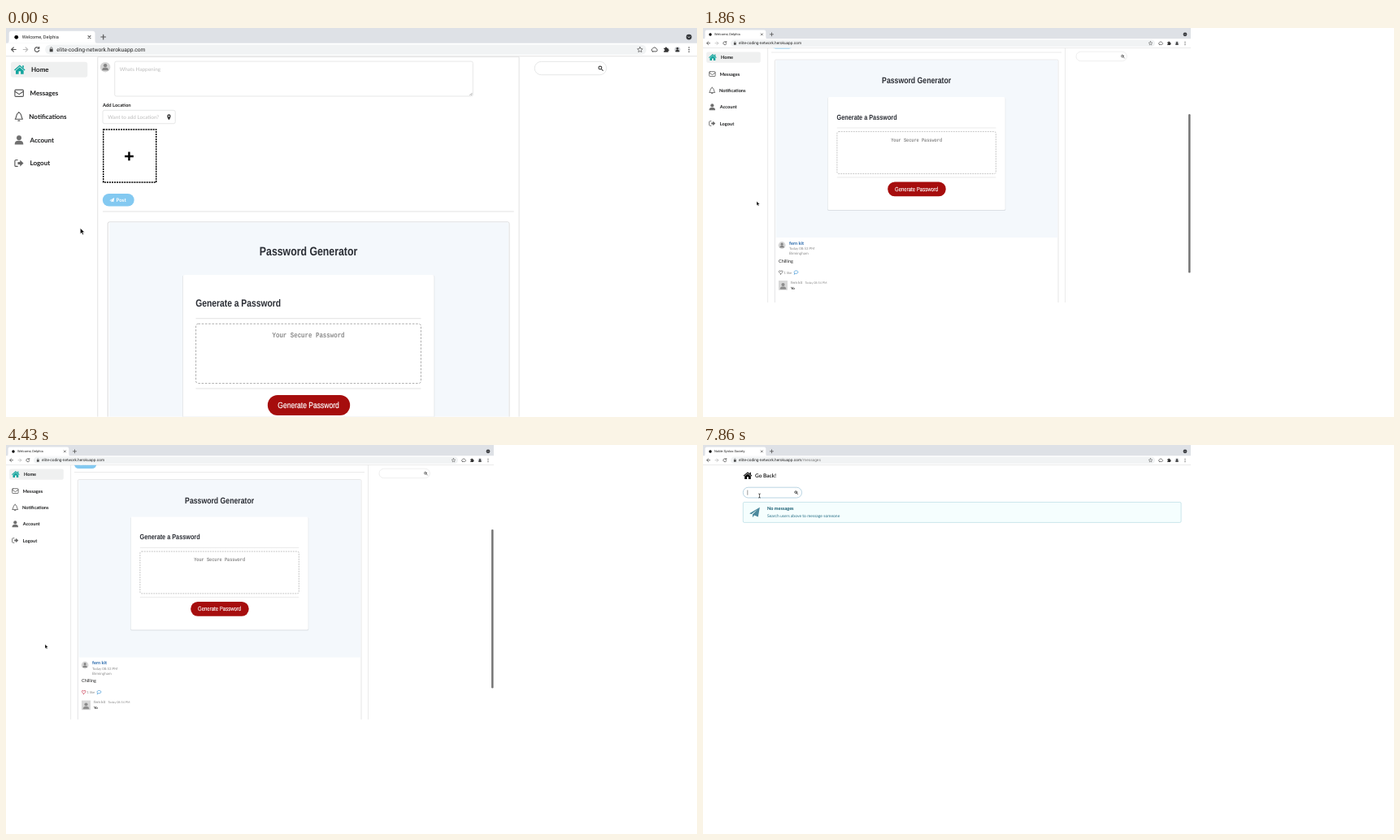
These frames come from a looping animation (850x479 px, 8 s). An HTML page:

```html
<!DOCTYPE html>
<html lang="en">
<head>
<meta charset="utf-8">
<title>Social feed walkthrough</title>
<style>
  html, body { margin: 0; width: 100%; height: 100%; overflow: hidden; background: #fff; }
  svg { display: block; width: 850px; height: 479px; }
  text { font-family: Lato, sans-serif; font-size: 4.5px; fill: #222; text-rendering: geometricPrecision; white-space: pre; }
  .ui { font-family: Roboto, sans-serif; }
  .b { font-weight: 700; }
  .menu text { font-size: 5.65px; font-weight: 700; fill: #1b1c1d; }
  .hint { fill: #bdbdbd; }
  .dim { fill: #8a8a8a; }
  .box { fill: #fff; stroke: #dcdddd; stroke-width: .5; }
  .rule { stroke: #d6d6d6; stroke-width: .5; fill: none; }
  .line { fill: none; stroke: #555; stroke-width: .8; stroke-linecap: round; stroke-linejoin: round; }
  .pic text { font-family: "Liberation Sans", Arial, sans-serif; }
  .pic .code { font-family: "Liberation Mono", "Courier New", monospace; }
</style>
</head>
<body>
<svg viewBox="0 0 850 479">
  <defs>
    <clipPath id="view"><rect width="600" height="338"/></clipPath>
    <clipPath id="page"><rect y="24.8" width="600" height="313.2"/></clipPath>
    <path id="house" d="M-4.8.3 0-3.9 4.8.3 4.1 1 0-2.6-4.1 1zM-3.4 1 0-1.9 3.4 1V4H.9V1.5H-.9V4H-3.4zM2.3-3.4h1.2v2.3l-1.2-1z"/>
    <path id="plane" d="M-5 1 5-5 3.4 4.4-.4 2.8-2 5-2 2 3-3-3.2 1.7z"/>
    <g id="person"><circle cy="-1.7" r="1.9"/><path d="M-3.4 3.6C-3.4 1-2 .6 0 .6S3.4 1 3.4 3.6z"/></g>
    <g id="lens" fill="none" stroke-width=".8" stroke-linecap="round"><circle cx="-.4" cy="-.4" r="1.35"/><path d="M.7.7 2 2"/></g>
    <g id="face"><circle r="4.4" fill="#d6d6d6"/><use href="#person" fill="#858585" transform="scale(.8)"/></g>
  </defs>

  <g id="screen" clip-path="url(#view)">
    <!-- browser frame -->
    <rect width="600" height="13.2" fill="#dee1e6"/>
    <path d="M1 13.2Q2.6 13.2 2.6 11V4.8Q2.6 2.6 4.8 2.6H75.2Q77.3 2.6 77.3 4.8V11Q77.3 13.2 79 13.2z" fill="#fff"/>
    <circle cx="9" cy="8" r="1.7"/>
    <text id="tab" class="ui" x="14" y="9.3" style="font-size:4px"></text>
    <path class="line" d="M71.3 6.8l2.1 2.1m0-2.1-2.1 2.1" stroke-width=".6"/>
    <path class="line" d="M82.5 7.8h4m-2-2v4"/>
    <circle cx="593" cy="7.8" r="2.4" fill="#35383c"/>
    <path d="M592 7.4l1 1 1-1" fill="none" stroke="#fff" stroke-width=".5"/>
    <rect x="34" y="14.5" width="522" height="8.6" rx="4.3" fill="#f1f3f4"/>
    <path class="line" d="M8.6 18.7H4.8m1.8-1.9-1.9 1.9 1.9 1.9"/>
    <path class="line" d="M15 18.7h3.8m-1.8-1.9 1.9 1.9-1.9 1.9" style="stroke:#bbb"/>
    <path class="line" d="M28.5 17.5A2 2 0 1 0 28.8 19.4M28.8 16.5v1.3h-1.3"/>
    <path d="M37.9 18.2h2.8v2.5h-2.8z" fill="#444"/>
    <path class="line" d="M38.5 18.2v-.7a.8.8 0 0 1 1.6 0v.7" style="stroke-width:.5"/>
    <text class="ui" x="44" y="20.3" style="font-size:4.75px">elite-coding-network.herokuapp.com<tspan id="path" fill="#777"></tspan></text>
    <path class="line" d="M550.5 16.5l.7 1.5 1.6.2-1.2 1.1.3 1.6-1.4-.8-1.4.8.3-1.6-1.2-1.1 1.6-.2z" style="stroke-width:.5"/>
    <path class="line" d="M561.5 20.4h3.2a1.2 1.2 0 0 0 0-2.3 1.7 1.7 0 0 0-3.2-.2 1.3 1.3 0 0 0 0 2.5z" style="stroke-width:.7"/>
    <path d="M571.2 17.4h1.1a.8.8 0 0 1 1.6 0h1.1v1.1a.8.8 0 0 1 0 1.6v.9h-3.8v-1a.8.8 0 0 0 0-1.6z" fill="#333"/>
    <circle cx="583" cy="18.7" r="2.5" fill="#cfd2d6"/>
    <use href="#person" transform="translate(583 18.8) scale(.52)" fill="#333"/>
    <g fill="#444"><circle cx="593" cy="17" r=".55"/><circle cx="593" cy="18.8" r=".55"/><circle cx="593" cy="20.6" r=".55"/></g>
    <path class="rule" d="M0 24.5H600"/>

    <g clip-path="url(#page)">
      <g id="feed">
        <g id="scroll">
          <path class="rule" d="M79.6 25.2H445.5V520.5H79.6z"/>
          <use href="#face" x="86.2" y="34"/>
          <rect class="box" x="94.4" y="29" width="311" height="30.3" rx="1.5"/>
          <text class="hint" x="98.6" y="37.2">Whats Happening</text>
          <path d="M402.6 58.6l2.2-2.2m-1 2.2 1-1" stroke="#777" stroke-width=".4"/>
          <text class="b" x="84" y="68.5" style="font-size:4.15px">Add Location</text>
          <rect class="box" x="84" y="71.5" width="63" height="11.6" rx="1.5"/>
          <text class="hint" x="88.4" y="78.9">Want to add Location?</text>
          <path d="M141.5 80c-2.2-2.8-1.8-5 0-5s2.2 2.2 0 5zM141.5 76a.6.6 0 1 0 .01 0z" fill="#333" fill-rule="evenodd"/>
          <rect x="84.5" y="88.2" width="45.9" height="45.9" fill="none" stroke="#000" stroke-dasharray="1.45 .7"/>
          <path d="M103.1 111.5h7.6m-3.8-3.8v7.6" stroke="#000" stroke-width="1.7"/>
          <rect x="83.9" y="144" width="27.4" height="11" rx="5.5" fill="#83c9f1"/>
          <use href="#plane" transform="translate(92 149.5) scale(.4)" fill="#fff"/>
          <text class="b" x="95.6" y="151.1" style="font-size:4.4px;fill:#fff">Post</text>
          <path class="rule" d="M84 159.5H441"/>

          <rect x="88.4" y="168.6" width="348.6" height="317.8" rx="1.5" fill="#fff" stroke="#d4d4d5" stroke-width=".6"/>
          <path d="M89 486.5H436.5" stroke="#aaa" stroke-width=".6"/>
          <g class="pic">
            <rect x="89.6" y="169" width="346.8" height="218.5" fill="#f4f8fc"/>
            <rect x="153.2" y="214.9" width="219" height="139.6" rx="1.5" fill="#dce0e4"/>
            <rect x="153.7" y="214.5" width="218" height="139" rx="1.5" fill="#fff"/>
            <path class="rule" d="M164.8 252.5H360.3M164.8 313.4H360.3"/>
            <rect x="164.9" y="257.1" width="195.4" height="51.8" rx="2" fill="none" stroke="#aaa" stroke-width=".7" stroke-dasharray="1.8 1.2"/>
            <rect x="227.2" y="319" width="71.5" height="17.7" rx="8.6" fill="#a60d0d"/>
            <!-- the screenshot is narrowed to fit the card -->
            <g transform="translate(262.6) scale(.82 1)">
              <text class="b" y="197.7" text-anchor="middle" style="font-size:10.6px;fill:#2a2d34">Password Generator</text>
              <text class="b" x="-119.5" y="242.2" style="font-size:8.9px;fill:#2a2d34">Generate a Password</text>
              <text class="code b" y="269" text-anchor="middle" style="font-size:6.4px;fill:#8c8c8c">Your Secure Password</text>
              <text y="330.4" text-anchor="middle" style="font-size:7.35px;fill:#fff;stroke:#fff;stroke-width:.15">Generate Password</text>
            </g>
          </g>

          <use href="#face" x="97.1" y="397"/>
          <text class="b" x="106" y="396.3" style="font-size:5.6px;fill:#1e62a8">fern kit</text>
          <text class="dim" x="106" y="402.7" style="font-size:4.35px">Today 08:53 PM</text>
          <text class="dim" x="106" y="408.9">Birmingham</text>
          <text x="93" y="418.2" style="font-size:5.5px">Chilling</text>
          <path id="heart" class="line" d="M95.7 432.5C92.5 430 93.2 428.3 94.4 428.3q.9 0 1.3 1 .4-1 1.3-1c1.2 0 1.9 1.7-1.3 4.2z" style="stroke-width:.7"/>
          <text class="dim" x="99.5" y="432.1" style="font-size:4.2px">1 like</text>
          <path class="line" d="M112.3 432.5l.5-1.1a2.4 1.8 0 1 1 1.2.5z" style="stroke:#2185d0;stroke-width:.6"/>
          <rect x="93" y="440.6" width="11" height="11.6" fill="#d8d8d8"/>
          <use href="#person" transform="translate(98.5 447.4) scale(1.1)" fill="#8d8d8d"/>
          <text x="108" y="444.4" style="fill:#777">fern kit</text>
          <text class="dim" x="125.6" y="444.2" style="font-size:3.75px">Today 08:54 PM</text>
          <text class="b" x="108" y="451.1" style="font-size:4.4px">Yo</text>
          <rect class="box" x="93" y="471.1" width="328" height="11.6" rx="1.2"/>
          <text class="hint" x="97.2" y="478.5">Add Comment</text>
          <path d="M420 471h10.8q1.2 0 1.2 1.2v9.4q0 1.2-1.2 1.2H420z" fill="#86c2e6"/>
          <path d="M426.2 475.2H424.2V479H428V477.3M425.7 477.5l2.7-2.8" fill="none" stroke="#fff" stroke-width=".7"/>
          <path class="line" d="M259.4 502.4a2.7 2.7 0 0 1 4.9-1M264.7 503.8a2.7 2.7 0 0 1-4.9 1M264.9 499.8v2.1h-2.1M259.2 506.3v-2.1h2.1" style="stroke:#111;stroke-width:1"/>
        </g>

        <g id="fixed" class="menu">
          <rect x="4.2" y="29.5" width="66.6" height="13.3" rx="2" fill="#eff0f0"/>
          <use href="#house" x="11.9" y="36" fill="#13a59e"/>
          <text x="21.9" y="38.1">Home</text>
          <rect class="line" x="7.7" y="53.7" width="7.4" height="5.9" rx=".8"/>
          <path class="line" d="M7.9 55.2l3.5 2.4 3.5-2.4"/>
          <text x="20.8" y="58.6">Messages</text>
          <path class="line" d="M8 79.2c1.3-1.2.6-5.3 3.2-5.6 2.6.3 1.9 4.4 3.2 5.6zM11.2 73v.5M10.5 80.6h1.4"/>
          <text x="20" y="79">Notifications</text>
          <use href="#person" transform="translate(11.3 97.3) scale(1.1)" fill="#707070"/>
          <text x="20.8" y="99.2">Account</text>
          <path class="line" d="M10 114.7H8.6q-.9 0-.9.9v3.8q0 .9.9.9H10"/>
          <path d="M10.2 116.5h2v-1.8l3 2.8-3 2.8v-1.8h-2z" fill="#666"/>
          <text x="20.8" y="119.6">Logout</text>
          <rect class="box" x="459" y="29.2" width="62.4" height="11.5" rx="5.7"/>
          <use href="#lens" x="516.3" y="35" stroke="#444"/>
        </g>
        <rect id="bar" x="597.1" width="2.5" height="195.5" rx="1.2" fill="#757575"/>
      </g>

      <g id="inbox">
        <use href="#house" transform="translate(55 37.5) scale(1.12)"/>
        <text class="b" x="64" y="40" style="font-size:6.5px">Go Back!</text>
        <rect id="field" class="box" x="49.3" y="52.2" width="72.2" height="12.8" rx="6.3"/>
        <path id="caret" d="M54.8 55.5v6.2" stroke="#333" stroke-width=".5"/>
        <use href="#lens" x="114.6" y="58.5" stroke="#222"/>
        <rect x="49.3" y="70.4" width="538.8" height="25" rx="1.5" fill="#f5fefe" stroke="#a9d5de" stroke-width=".6"/>
        <use href="#plane" transform="translate(63.5 83) scale(1.27)" fill="#4c899d"/>
        <text class="b" x="79" y="80.4" style="font-size:5.6px;fill:#0e566c">No messages</text>
        <text x="79" y="88.6" style="font-size:5px;fill:#276f86">Search users above to message someone</text>
      </g>
    </g>
    <path id="arrow" d="M0 0V5l1.2-1.1.8 1.8.9-.4-.8-1.7h1.6z" fill="#000" stroke="#fff" stroke-width=".35"/>
    <path id="beam" class="line" d="M-1-2.5q1 0 1 .6 0-.6 1-.6M0-2V2M-1 2.5q1 0 1-.6 0 .6 1 .6" style="stroke:#111;stroke-width:.6"/>
  </g>
</svg>
<script>
  const el = id => document.getElementById(id);
  const set = (id, name, value) => el(id).setAttribute(name, value);
  const show = (id, on) => set(id, 'display', on ? 'inline' : 'none');

  const LOOP = 8000, STEP = 1000 / 7;
  const OPEN = 47, FOCUS = 52;

  // Each key is [step, value, ...].
  const scrollKeys = [[8, 0], [13, 129.5], [17, 185], [18, 187], [27, 187], [31, 126], [36, 0], [37, -.7], [38, 0]];
  const barKeys = [[8, 0], [9, 1], [19, 1], [22, 0], [27, 0], [28, 1], [39, 1], [42, 0]];
  const mouseKeys = [[1, 64.5, 174], [5, 66, 213.5], [24, 66, 213.5], [28, 58, 235], [31, 48, 245.5],
    [34, 47, 243], [37, 41.7, 222], [42, 34, 57], [48, 34, 57], [52, 69.5, 62.5]];

  function at(keys, step) {
    const i = keys.findIndex(key => key[0] > step);
    if (i === 0) return keys[0].slice(1);
    if (i < 0) return keys[keys.length - 1].slice(1);
    const a = keys[i - 1], b = keys[i];
    const p = (step - a[0]) / (b[0] - a[0]);
    return a.slice(1).map((v, j) => v + (b[j + 1] - v) * p);
  }

  function draw(time) {
    const step = Math.floor((time % LOOP + 5) / STEP);
    const [top] = at(scrollKeys, step);
    const [mx, my] = at(mouseKeys, step);
    const inbox = step >= OPEN, focus = step >= FOCUS;

    set('screen', 'transform', `scale(${step < 1 ? 850 / 600 : 1})`);
    set('scroll', 'transform', `translate(0 ${-top})`);
    set('fixed', 'transform', `translate(0 ${Math.max(0, -top)})`);
    set('bar', 'y', 25 + Math.max(0, top) * .626);
    set('bar', 'opacity', at(barKeys, step)[0]);
    el('heart').style.stroke = step < 20 ? '#555' : '#c8324b';

    show('feed', !inbox);
    show('inbox', inbox);
    el('tab').textContent = inbox ? 'Noble Syntax Society' : 'Welcome, Delphia';
    el('path').textContent = inbox ? '/messages' : '';
    el('field').style.stroke = focus ? '#72a9c4' : '#dcdddd';
    show('caret', focus);

    show('arrow', !focus);
    show('beam', focus);
    for (const id of ['arrow', 'beam']) set(id, 'transform', `translate(${mx} ${my})`);
  }

  const start = performance.now();
  function tick(now) {
    draw(Math.max(0, now - start));
    requestAnimationFrame(tick);
  }
  draw(0);
  requestAnimationFrame(tick);
</script>
</body>
</html>
```
